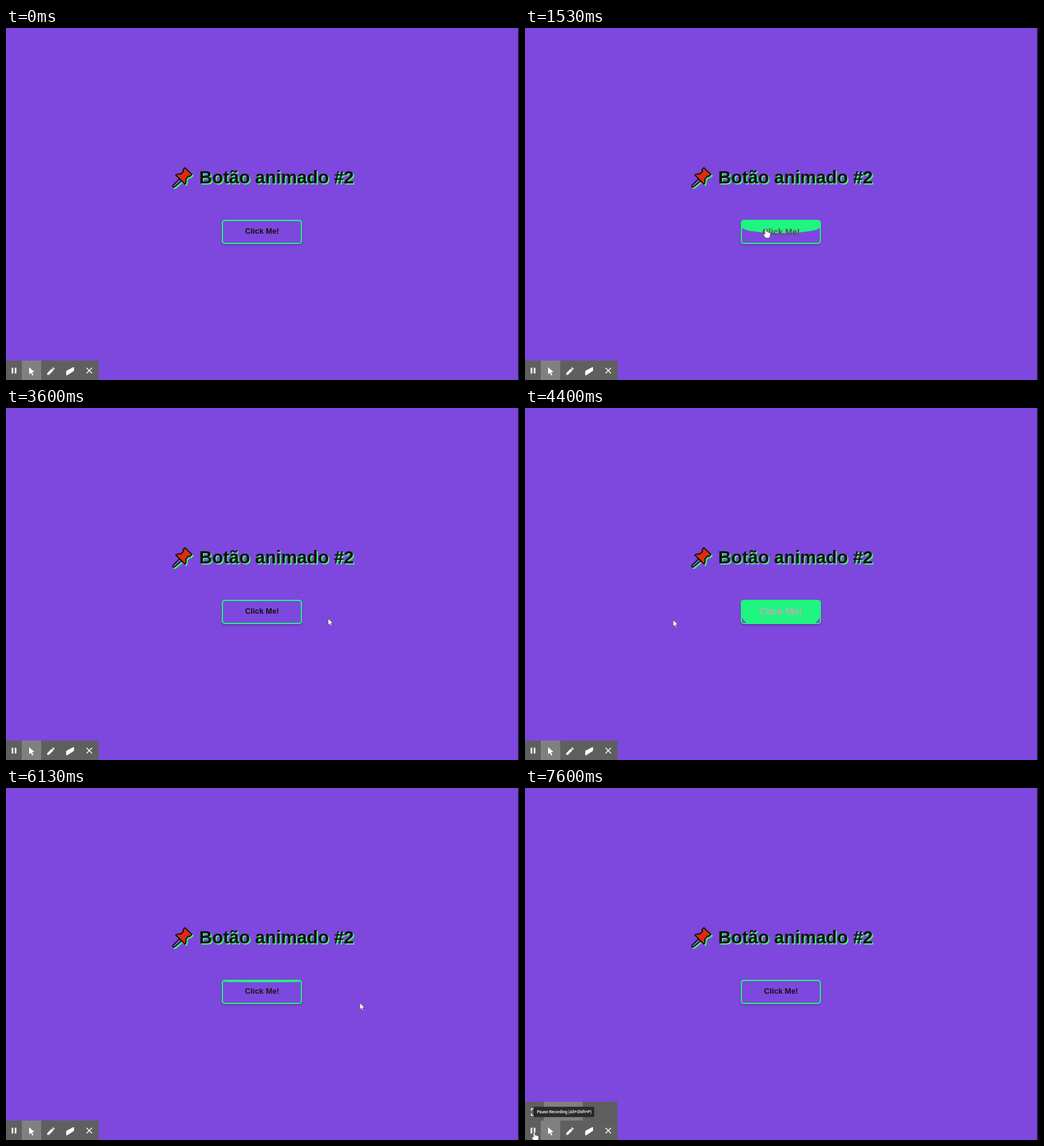
An HTML page for the animation above (7660 ms loop, 844x580 px).

```html
<!DOCTYPE html>
<html lang="pt">
<head>
<meta charset="utf-8">
<title>Botão animado</title>
<style>
@property --p { syntax: "<number>"; inherits: true; initial-value: 0; }

html, body { margin: 0; width: 100%; height: 100%; overflow: hidden; background: #7e48de; }
body { position: relative; font-family: "Liberation Sans", Arial, sans-serif; }
svg { position: absolute; left: 0; top: 0; width: 844px; height: 580px; }

.heading { filter: drop-shadow(2px 2px 0 #43f573); }
.heading text { font-weight: bold; font-size: 29.55px; fill: #121212; }

.button {
  position: absolute; left: 355.3px; top: 316.2px; width: 132px; height: 39.4px;
  box-sizing: border-box; border: 2.6px solid #1ff57f; border-radius: 5px;
  box-shadow: 0 1.5px 3px rgba(0, 0, 0, .35);
  overflow: hidden;
  display: flex; align-items: center; justify-content: center;
  font-weight: bold; font-size: calc(12.8px + 4.3px * var(--p)); line-height: 1;
  white-space: nowrap;
  color: color-mix(in srgb, #f3e4e0 calc(var(--p) * 100%), #111);
  animation: hover 7660ms ease infinite;
}
.button::before {
  content: ""; position: absolute; left: 0; top: 0; width: 100%;
  height: calc(66px * var(--p));
  border-radius: 0 0 50% 50%; background: #1ff57f;
}
.button span { position: relative; top: -.3px; }

@keyframes hover {
  0%, 18.67% { --p: 0; }
  25.2%, 37.86% { --p: 1; }
  44.39%, 48.3% { --p: 0; }
  54.83%, 56.27% { --p: 1; }
  62.79%, 64.56% { --p: 0; }
  71.08%, 74.93% { --p: 1; }
  81.46%, 100% { --p: 0; }
}

.pointer { animation: travel 7660ms linear infinite; }
.arrow { animation: arrow 7660ms step-end infinite; }
.hand { animation: hand 7660ms step-end infinite; }
.panel { animation: open 7660ms linear infinite; }
.tooltip { animation: tip 7660ms linear infinite; }
.tooltip text { font: 500 6.6px Roboto, sans-serif; fill: #fff; }

@keyframes travel {
  0%, 15.01% { transform: translate(100px, 258px); }
  16.97% { transform: translate(250px, 278px); }
  18.67% { transform: translate(355px, 318px); }
  19.97% { transform: translate(396px, 331px); }
  22.58% { transform: translate(410px, 336px); }
  27.81%, 33.94% { transform: translate(425px, 338px); }
  37.34% { transform: translate(483px, 341px); }
  37.86% { transform: translate(492px, 342px); }
  41.12% { transform: translate(632px, 350px); }
  44.39% { transform: translate(617px, 350px); }
  48.3% { transform: translate(487px, 345px); }
  52.22% { transform: translate(400px, 342px); }
  55.48% { transform: translate(390px, 345px); }
  56.27% { transform: translate(354px, 350px); }
  57.44% { transform: translate(244px, 349px); }
  59.4% { transform: translate(190px, 346px); }
  62.01% { transform: translate(200px, 345px); }
  64.56% { transform: translate(355px, 346px); }
  66.06% { transform: translate(382px, 348px); }
  71.8% { transform: translate(430px, 346px); }
  74.93% { transform: translate(488px, 350px); }
  80.03% { transform: translate(582px, 354px); }
  81.59%, 86.16% { transform: translate(594px, 356px); }
  88.77% { transform: translate(430px, 358px); }
  90.08% { transform: translate(300px, 357px); }
  91.38% { transform: translate(200px, 405px); }
  92.3% { transform: translate(150px, 440px); }
  92.82% { transform: translate(100px, 490px); }
  93.47% { transform: translate(70px, 548px); }
  94.78%, 100% { transform: translate(15px, 567px); }
}
@keyframes arrow {
  0% { opacity: 0; }
  15.01% { opacity: 1; }
  18.67% { opacity: 0; }
  37.86% { opacity: 1; }
  48.3% { opacity: 0; }
  56.27% { opacity: 1; }
  64.56% { opacity: 0; }
  74.93% { opacity: 1; }
  93.47%, 100% { opacity: 0; }
}
@keyframes hand {
  0% { opacity: 0; }
  18.67% { opacity: 1; }
  37.86% { opacity: 0; }
  48.3% { opacity: 1; }
  56.27% { opacity: 0; }
  64.56% { opacity: 1; }
  74.93% { opacity: 0; }
  93.47%, 100% { opacity: 1; }
}
@keyframes open {
  0%, 93.47% { transform: translateY(32px); }
  94.78%, 100% { transform: none; }
}
@keyframes tip {
  0%, 96.6% { opacity: 0; }
  98.56%, 100% { opacity: 1; }
}
</style>
</head>
<body>
<svg viewBox="0 0 844 580">
  <path d="M842.6 0H844V580H842.6Z" fill="#17102a"/>
  <g class="heading">
    <path d="M286 248L274.5 259.5V262H277L289.5 251.5" fill="#8a5ae0" stroke="#111" stroke-width="1.8" stroke-linejoin="round"/>
    <path d="M294.3 230.3L305.8 241.3L302.4 244.6L300 244.2L295.8 249.4Q297 253.5 294.6 257.4L279.3 242.2Q283 239.6 287.2 240.8L292 236.4L291.3 233.4Z" fill="#e22a12" stroke="#111" stroke-width="2" stroke-linejoin="round"/>
    <text x="317.8" y="256">Botão animado #2</text>
  </g>
</svg>

<div class="button"><span>Click Me!</span></div>

<svg viewBox="0 0 844 580">
  <g class="panel">
    <path d="M0 517H152V549H0Z" fill="#5f5f5f"/>
    <path d="M31 517H95V549H31Z" fill="#808080"/>
    <path d="M14 528.5H10.5V532M10.5 536V539.5H14M18 528.5H21.5V532M21.5 536V539.5H18" fill="none" stroke="#fff" stroke-width="1.4"/>
  </g>
  <path d="M0 548H152.5V580H0Z" fill="#5f5f5f"/>
  <path d="M26 548H58V580H26Z" fill="#808080"/>
  <g fill="#fff">
    <path d="M9.3 559.7H12V569.3H9.3ZM14.4 559.7H17.1V569.3H14.4Z"/>
    <path d="M38 559L46.8 566.8L42.8 567.2L45 571.6L43 572.5L41 568L38 570.6Z"/>
    <path d="M67.8 571.5V568.7L75.3 561.2L78.1 564L70.6 571.5ZM76.1 560.4L77.5 559L80.3 561.8L78.9 563.2Z"/>
    <path d="M99 566.2Q99 565 100 564.4L110.3 558.9Q112 558.2 112 560V563.6Q112 564.8 111 565.5L101 572Q99 573 99 571Z"/>
  </g>
  <path d="M132.5 560L141.5 569M141.5 560L132.5 569" stroke="#fff" stroke-width="1.5"/>
  <g class="tooltip">
    <rect x="14" y="525.3" width="100" height="17" rx="2" fill="#292929"/>
    <text x="19.7" y="536.1">Pause Recording (Alt+Shift+P)</text>
  </g>
  <g class="pointer" stroke="#333" stroke-width=".7" fill="#fff" stroke-linejoin="round">
    <path class="arrow" d="M0 0V11.2L2.6 8.8L4.3 12.7L6.2 11.9L4.5 8.1H8Z"/>
    <path class="hand" d="M-1.3 .8Q0 -1 1.3 .8V5Q3 4 3.7 5.5Q5 4.9 5.7 6.2Q7.4 5.9 7.5 7.5V10.5L6 15H-.5L-4 9.6Q-4.4 7.4 -2.5 8L-1.3 9.2Z"/>
  </g>
</svg>
</body>
</html>
```
